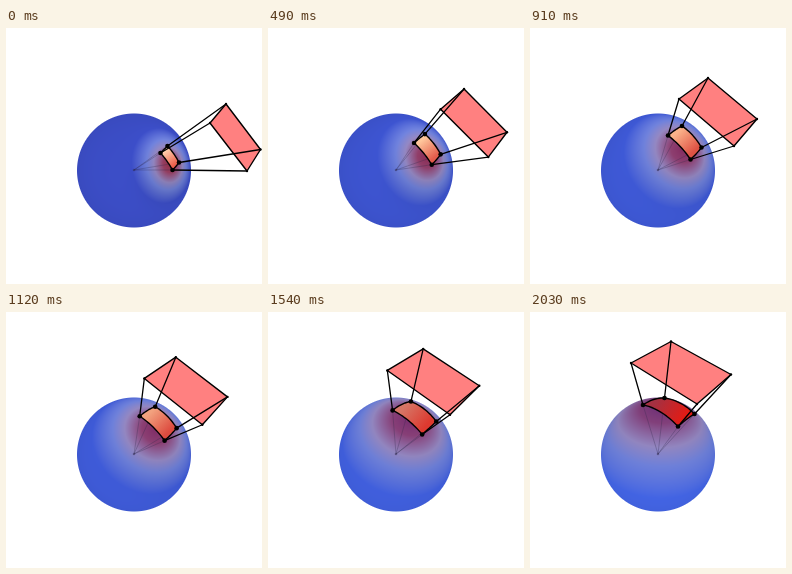
Write an HTML page with a canvas that moves like this. It is 256 by 256 pixels and loops after 2.1 s.

```html
<!DOCTYPE html>
<html lang="en">
<head>
<meta charset="utf-8">
<title>Solid angle</title>
<style>
html, body { margin: 0; width: 100%; height: 100%; overflow: hidden; background: #fff; }
canvas { display: block; width: 256px; height: 256px; }
</style>
</head>
<body>
<canvas id="stage" width="256" height="256"></canvas>
<script>
const ctx = document.getElementById('stage').getContext('2d');
const CX = 128, CY = 142.5, R = 57;
const STEP = 70, STEPS = 30, MID = 13, END = 29;

// Start, middle and end poses; a parabola in time joins them.
const outer = [
  [[204, 95], [149, 71], [101, 51]],
  [[220, 76], [178, 50], [141, 29.5]],
  [[254.5, 121.5], [227, 91], [201, 62.5]],
  [[241, 143], [204, 118], [167, 92]]
];
const inner = [
  [[154.5, 125], [138, 107.5], [113, 93]],
  [[161.5, 118], [152, 98], [134.5, 86]],
  [[173, 134.5], [171.5, 119.5], [164.5, 102]],
  [[166.5, 142], [160.5, 131.5], [148, 114.5]]
];
const glow = [[164, 136], [153, 122], [131, 96]];
const glowWidth = [[0.33], [0.5], [0.83]];
const hot = [[150, 45, 70], [132, 45, 98], [112, 48, 122]];
const cold = [[60, 78, 200], [63, 90, 217], [68, 102, 232]];
const patchLight = [[255, 205, 170], [251, 178, 138], [165, 48, 65]];
const patchDark = [[235, 95, 75], [222, 82, 68], [225, 28, 22]];

const clamp = (v, lo, hi) => Math.min(hi, Math.max(lo, v));
const mix = (p, q, k) => p.map((v, i) => v + (q[i] - v) * k);
const rgb = c => `rgb(${c.map(v => clamp(Math.round(v), 0, 255)).join(',')})`;

function at(keys, n) {
  const w0 = (n - MID) * (n - END) / (MID * END);
  const w1 = n * (END - n) / (MID * (END - MID));
  const w2 = n * (n - MID) / (END * (END - MID));
  return keys[0].map((v, i) => v * w0 + keys[1][i] * w1 + keys[2][i] * w2);
}

function lift([x, y]) {
  const u = (x - CX) / R, v = (y - CY) / R;
  return [u, v, Math.sqrt(Math.max(0, 1 - u * u - v * v))];
}

const dot = (p, q) => p[0] * q[0] + p[1] * q[1] + p[2] * q[2];

function drawSphere(n) {
  const axis = lift(at(glow, n)), width = at(glowWidth, n)[0];
  const red = at(hot, n), blue = at(cold, n);
  const stops = [[0, red], [0.45, mix(red, [150, 80, 125], 0.5)],
    [1, [146, 134, 192]], [1.4, [110, 128, 217]], [2.2, blue]];
  const tilt = 0.13 * (1 - n / END);
  const left = Math.floor(CX - R) - 1, top = Math.floor(CY - R) - 1;
  const size = 2 * R + 4;
  const img = ctx.createImageData(size, size);

  for (let j = 0; j < size; j++) {
    for (let i = 0; i < size; i++) {
      const x = left + i + 0.5, y = top + j + 0.5;
      const r = Math.hypot(x - CX, y - CY);
      const cover = clamp(R - r + 0.5, 0, 1);
      if (!cover) continue;
      const p = lift([x, y]);
      const u = Math.acos(clamp(dot(p, axis), -1, 1)) / width;
      let s = 1;
      while (s < stops.length - 1 && u > stops[s][0]) s++;
      const [u0, c0] = stops[s - 1], [u1, c1] = stops[s];
      const k = clamp((u - u0) / (u1 - u0), 0, 1);
      const halo = Math.exp(-((u - 1.2) ** 2));
      const shade = (0.94 + 0.06 * p[2]) * (1 - tilt * halo * (p[1] + 0.2));
      const c = mix(c0, c1, k);
      const o = 4 * (j * size + i);
      for (let m = 0; m < 3; m++) img.data[o + m] = c[m] * shade;
      img.data[o + 3] = 255 * cover;
    }
  }
  ctx.putImageData(img, left, top);
}

// Great-circle arc between two points on the ball, projected flat.
function arcTo(from, to) {
  const p = lift(from), q = lift(to);
  const angle = Math.acos(clamp(dot(p, q), -1, 1));
  for (let i = 1; i <= 12; i++) {
    const k = i / 12;
    const a = Math.sin((1 - k) * angle) / Math.sin(angle);
    const b = Math.sin(k * angle) / Math.sin(angle);
    ctx.lineTo(CX + R * (a * p[0] + b * q[0]), CY + R * (a * p[1] + b * q[1]));
  }
}

function line(p, q) {
  ctx.beginPath();
  ctx.moveTo(...p);
  ctx.lineTo(...q);
  ctx.stroke();
}

function disc(p, r) {
  ctx.beginPath();
  ctx.arc(p[0], p[1], r, 0, 2 * Math.PI);
  ctx.fill();
}

function draw(n) {
  const far = outer.map(k => at(k, n));
  const near = inner.map(k => at(k, n));
  ctx.clearRect(0, 0, 256, 256);
  ctx.lineJoin = ctx.lineCap = 'round';
  drawSphere(n);

  ctx.strokeStyle = ctx.fillStyle = 'rgba(45,40,75,0.36)';
  ctx.lineWidth = 0.8;
  near.forEach(p => line([CX, CY - 0.5], p));
  disc([CX, CY - 0.5], 1.3);

  const [a, b, c, d] = near;
  const fill = ctx.createLinearGradient(...mix(a, b, 0.4), ...mix(c, d, 0.6));
  fill.addColorStop(0.1, rgb(at(patchLight, n)));
  fill.addColorStop(0.9, rgb(at(patchDark, n)));
  ctx.beginPath();
  ctx.moveTo(...a);
  near.forEach((p, i) => arcTo(p, near[(i + 1) % 4]));
  ctx.closePath();
  ctx.fillStyle = fill;
  ctx.fill();
  ctx.strokeStyle = '#000';
  ctx.lineWidth = 1.4;
  ctx.stroke();

  ctx.beginPath();
  far.forEach(p => ctx.lineTo(...p));
  ctx.closePath();
  ctx.fillStyle = '#ff8080';
  ctx.fill();
  ctx.stroke();

  ctx.lineWidth = 1.3;
  near.forEach((p, i) => line(p, far[i]));
  ctx.fillStyle = '#000';
  near.forEach(p => disc(p, 2.3));
  far.forEach(p => disc(p, 1.2));
}

let shown = -1;
const start = performance.now();
function tick() {
  const n = Math.floor((performance.now() - start) / STEP) % STEPS;
  if (n !== shown) draw(shown = n);
  requestAnimationFrame(tick);
}
tick();
</script>
</body>
</html>
```
